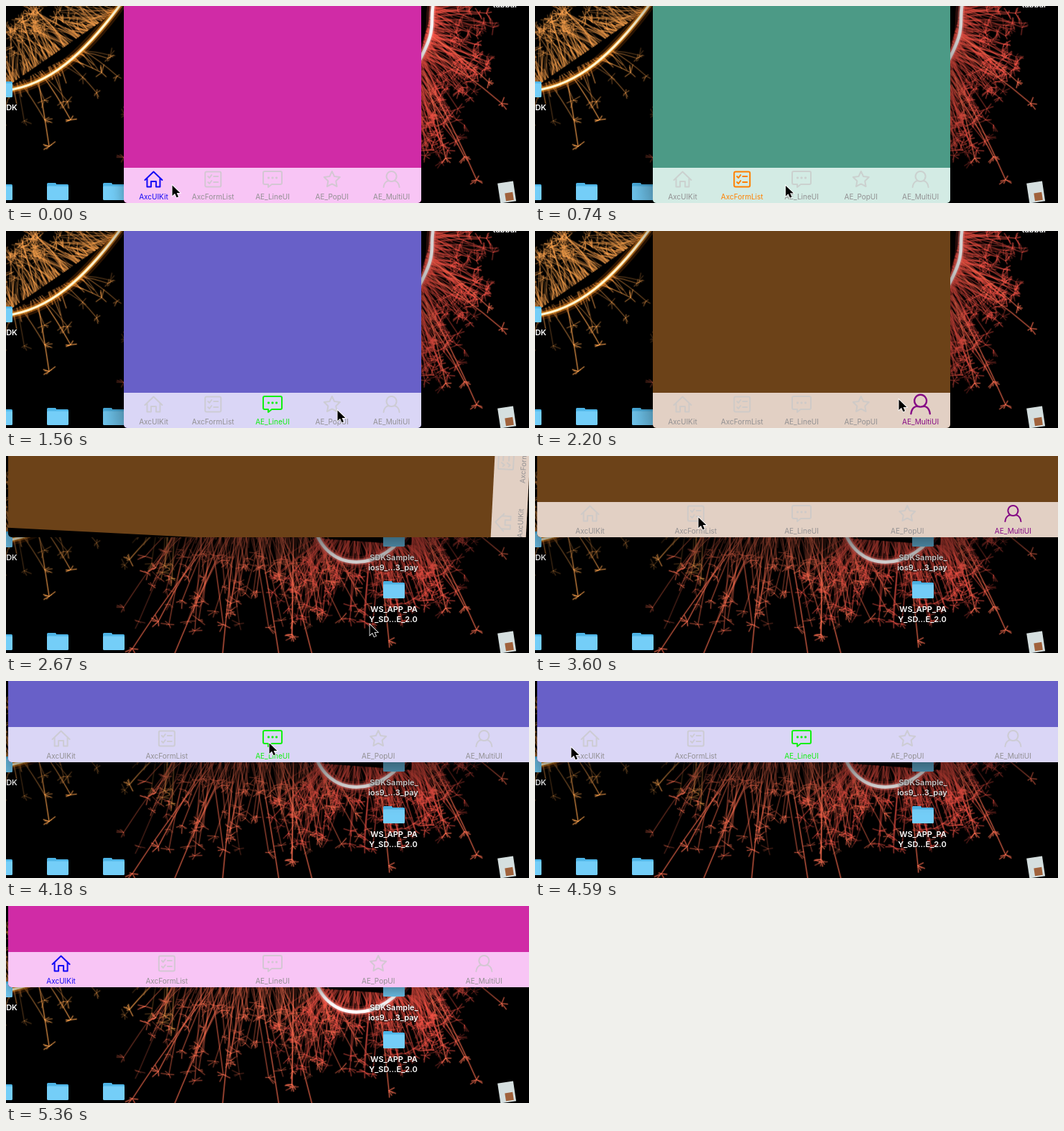
Write an HTML page with a canvas that moves like this. It is 728 px wide and 274 px high and loops after 5.46 s.

```html
<!DOCTYPE html>
<html lang="en">
<head>
<meta charset="utf-8">
<title>Tab bar demo</title>
<style>
html, body { margin: 0; width: 728px; height: 274px; overflow: hidden; background: #000; }
canvas { display: block; }
</style>
</head>
<body>
<canvas id="stage" width="728" height="274"></canvas>
<script>
const W = 728, H = 274, LOOP = 5460;
const ctx = document.getElementById('stage').getContext('2d');
const desktop = document.createElement('canvas');
desktop.width = W;
desktop.height = H;

const TABS = [
  { label: 'AxcUIKit', tint: '#1408f5', page: '#d02ba6', bar: '#f8c5f5',
    icon: 'M-12 1L0-10.5L12 1M-9-1.5V10.5H-3.5V3H3.5V10.5H9V-1.5' },
  { label: 'AxcFormList', tint: '#ff8000', page: '#4c9a86', bar: '#d3ebe4',
    icon: 'M-9-10.5H9a2 2 0 0 1 2 2V8.5a2 2 0 0 1-2 2H-9a2 2 0 0 1-2-2V-8.5a2 2 0 0 1 2-2zM-7-4l2 2 3-4M1-4H7M-7 4l2 2 3-4M1 4H7' },
  { label: 'AE_LineUI', tint: '#10f010', page: '#6860c8', bar: '#dad6f6',
    icon: 'M-11-11H11a2 2 0 0 1 2 2V5a2 2 0 0 1-2 2H-1l-5 4V7H-11a2 2 0 0 1-2-2V-9a2 2 0 0 1 2-2zM-6-2.5h1v1h-1zM-.5-2.5h1v1h-1zM5-2.5h1v1h-1z' },
  { label: 'AE_PopUI', tint: '#f00', page: '#888', bar: '#ddd',
    icon: 'M0-11L3.3-4L11-3L5.4 2.5L6.8 10L0 6.4L-6.8 10L-5.4 2.5L-11-3L-3.3-4z' },
  { label: 'AE_MultiUI', tint: '#850a85', page: '#6c4218', bar: '#e2d0c4',
    icon: 'M0-11a7 7 0 1 0 .01 0zM-11 11C-10 3-5 2-3 2.5M11 11C10 3 5 2 3 2.5' }
];
TABS.forEach(tab => tab.path = new Path2D(tab.icon));

// [time, selected tab]
const CLICKS = [[-999, 0], [340, 1], [1090, 2], [2080, 4], [3780, 1], [4180, 2], [4770, 0]];
// [time, x, y] of the pointer tip
const POINTER = [
  [0, 231, 249], [60, 231, 249], [300, 268, 248], [450, 268, 248], [570, 261, 250], [590, 261, 250],
  [850, 402, 249], [1320, 402, 249], [1560, 461, 249], [1620, 480, 250], [1790, 521, 249],
  [2080, 521, 249], [2200, 506, 234], [3140, 506, 234], [3600, 227, 85], [3780, 227, 85],
  [4010, 366, 86], [4390, 366, 86], [4590, 50, 92], [4650, 60, 90], [4800, 60, 90], [5060, 120, 280]
];

const mix = (a, b, k) => a + (b - a) * k;
const clamp = v => Math.max(0, Math.min(1, v));
const smooth = v => { v = clamp(v); return v * v * (3 - 2 * v); };

let seed = 20;
function random() {
  seed = (seed * 16807) % 2147483647;
  return seed / 2147483647;
}

function drawSpark(c, x, y, angle, length, rgb, strength) {
  const dx = Math.cos(angle), dy = Math.sin(angle);
  const ex = x + dx * length, ey = y + dy * length + length * .06;
  const path = new Path2D();
  path.moveTo(x, y);
  path.quadraticCurveTo(x + dx * length * .5, y + dy * length * .5 - length * .03, ex, ey);
  if (length > 35) {
    for (let i = 0; i < 6; i++) {
      const a = angle + (random() - .5) * 4.4, r = 3 + random() * 8;
      path.moveTo(ex, ey);
      path.lineTo(ex + Math.cos(a) * r, ey + Math.sin(a) * r);
    }
  }
  for (const [width, alpha] of [[2.6, .25], [.8, .8]]) {
    c.lineWidth = width;
    c.strokeStyle = `rgba(${rgb},${alpha * strength})`;
    c.stroke(path);
  }
}

// Sparks leave a line from (x1,y1) to (x2,y2), turning from a1 to a2 degrees along it.
function drawFan(c, x1, y1, x2, y2, a1, a2, reach, count, rgb) {
  for (let i = 0; i < count; i++) {
    const u = random();
    const angle = (mix(a1, a2, u) + (random() - .5) * 55) * Math.PI / 180;
    drawSpark(c, mix(x1, x2, u), mix(y1, y2, u), angle, reach * (.12 + .88 * random() ** 2), rgb, .3 + random() * .5);
  }
}

function drawTrail(c, d, layers) {
  const path = new Path2D(d);
  for (const [width, color] of layers) {
    c.lineWidth = width;
    c.strokeStyle = color;
    c.stroke(path);
  }
}

function drawFolder(c, x, y) {
  c.fillStyle = '#4db4e6';
  c.beginPath();
  c.roundRect(x - 15, y - 12, 13, 8, 1.5);
  c.roundRect(x - 15, y - 10, 30, 10, 1.5);
  c.fill();
  c.fillStyle = '#74cef8';
  c.beginPath();
  c.roundRect(x - 15, y - 7.5, 30, 19.5, 1.5);
  c.fill();
}

function drawDesktop() {
  const c = desktop.getContext('2d');
  const orange = '255,165,80', coral = '255,112,82', red = '245,85,72';
  c.fillRect(0, 0, W, H);
  c.lineCap = 'round';
  drawFan(c, 0, 112, 155, 5, 265, 190, 80, 190, orange);
  drawFan(c, 0, 115, 110, 60, 85, 30, 65, 45, orange);
  drawFan(c, 195, 95, 240, 100, 125, 90, 80, 22, orange);
  drawFan(c, 240, 92, 440, 100, 118, 70, 145, 170, coral);
  drawFan(c, 430, 115, 570, 125, 125, 50, 115, 190, red);
  drawFan(c, 565, 115, 595, 0, 75, 0, 95, 260, red);
  const rays = [
    [300, 100, 176, 256], [285, 105, 212, 222], [315, 100, 232, 270], [350, 100, 383, 285], [375, 95, 428, 272],
    [400, 105, 398, 240], [320, 100, 300, 280], [520, 140, 533, 250], [580, 90, 655, 232], [585, 60, 690, 128],
    [585, 100, 612, 205], [580, 110, 638, 203], [590, 40, 672, 100], [240, 100, 208, 152], [45, 105, 60, 190],
    [50, 95, 90, 154], [220, 95, 172, 140]
  ];
  rays.forEach(([x, y, ex, ey], i) =>
    drawSpark(c, x, y, Math.atan2(ey - y, ex - x), Math.hypot(ex - x, ey - y), i > 13 ? orange : coral, 1));
  drawTrail(c, 'M-5 118C60 112 110 65 160-3',
    [[15, 'rgba(255,120,20,.18)'], [8, 'rgba(255,150,40,.5)'], [4, '#ffd27a'], [2, '#fffbe8']]);
  drawTrail(c, 'M428 95C445 165 525 165 565 95S588 30 595-5',
    [[16, 'rgba(255,80,70,.2)'], [9, 'rgba(255,125,115,.5)'], [5, '#f6dcdc'], [3, '#fff']]);

  [[-6, 115], [-6, 258], [72, 258], [150, 258], [540, 114], [540, 186]].forEach(([x, y]) => drawFolder(c, x, y));

  c.save();
  c.translate(697, 258);
  c.rotate(-.15);
  c.fillStyle = '#d5dfdf';
  c.fillRect(-11, -13, 22, 28);
  c.fillStyle = '#a0623c';
  c.fillRect(-3, 2, 11, 11);
  c.restore();

  c.font = '600 11px Inter, sans-serif';
  c.textAlign = 'center';
  c.textBaseline = 'middle';
  c.fillStyle = '#fff';
  c.shadowColor = '#000';
  c.shadowBlur = 3;
  c.shadowOffsetY = 1;
  const captions = [['DK', 8, 142], ['SDKSample_', 540, 142], ['ios9_...3_pay', 539, 156],
    ['WS_APP_PA', 540, 214], ['Y_SD...E_2.0', 539, 228], ['tabbar', 695, -1]];
  captions.forEach(args => c.fillText(...args));
}

function drawApp(w, h, selected, age) {
  const { page, bar } = TABS[selected];
  ctx.fillStyle = page;
  ctx.fillRect(-w / 2, -h / 2, w, h);
  ctx.fillStyle = bar;
  ctx.fillRect(-w / 2, h / 2 - 49, w, 49);
  ctx.font = '10px Inter, sans-serif';
  ctx.textAlign = 'center';
  ctx.textBaseline = 'middle';
  ctx.lineWidth = 2;
  ctx.lineCap = ctx.lineJoin = 'round';
  TABS.forEach((tab, i) => {
    const on = i === selected;
    const scale = on ? 1 + .2 * Math.sin(Math.PI * clamp(age / 230)) : 1;
    ctx.save();
    ctx.translate((i - 2) * w / 5, h / 2 - 33);
    ctx.fillStyle = on ? tab.tint : '#929092';
    ctx.fillText(tab.label, 0, 25);
    ctx.scale(scale, scale);
    ctx.strokeStyle = on ? tab.tint : 'rgba(200,200,200,.75)';
    ctx.stroke(tab.path);
    ctx.restore();
  });
}

function drawWindow(t) {
  const landscape = t >= 2670;
  const active = t >= 60 && t < 5360;
  const turn = smooth((t - 2630) / 380);
  const frame = new Path2D();
  if (landscape) frame.roundRect(3, -301, 736, 414, 5);
  else frame.roundRect(164, -462, 414, 736, 5);

  ctx.save();
  ctx.shadowColor = active ? 'rgba(0,0,0,.6)' : 'rgba(0,0,0,.4)';
  ctx.shadowBlur = active ? 50 : 22;
  ctx.shadowOffsetY = active ? 22 : 8;
  ctx.fillStyle = '#000';
  ctx.fill(frame);
  ctx.restore();

  const [since, selected] = CLICKS.findLast(([time]) => time <= t);
  const k = landscape ? turn : 0;
  ctx.save();
  ctx.clip(frame);
  ctx.translate(371, -94);
  if (landscape) ctx.rotate((k - 1) * Math.PI / 2);
  drawApp(mix(414, 736, k), mix(736, 414, k), selected, t - since);
  ctx.restore();
}

const arrow = new Path2D('M.5.5V15L4 11.8L6.5 17.3L9 16.2L6.6 10.9H11.3z');

function drawPointer(t) {
  const next = POINTER.findIndex(([time]) => time > t);
  if (next < 0) return;
  const [t0, x0, y0] = POINTER[next - 1], [t1, x1, y1] = POINTER[next];
  const k = smooth((t - t0) / (t1 - t0));
  ctx.save();
  ctx.translate(mix(x0, x1, k), mix(y0, y1, k));
  ctx.lineJoin = 'miter';
  ctx.lineWidth = 1.6;
  ctx.strokeStyle = '#fff';
  ctx.stroke(arrow);
  ctx.fillStyle = '#000';
  ctx.fill(arrow);
  ctx.restore();
}

function render(now) {
  const t = now % LOOP;
  ctx.drawImage(desktop, 0, 0);
  drawWindow(t);
  drawPointer(t);
  requestAnimationFrame(render);
}

drawDesktop();
render(performance.now());
</script>
</body>
</html>
```
